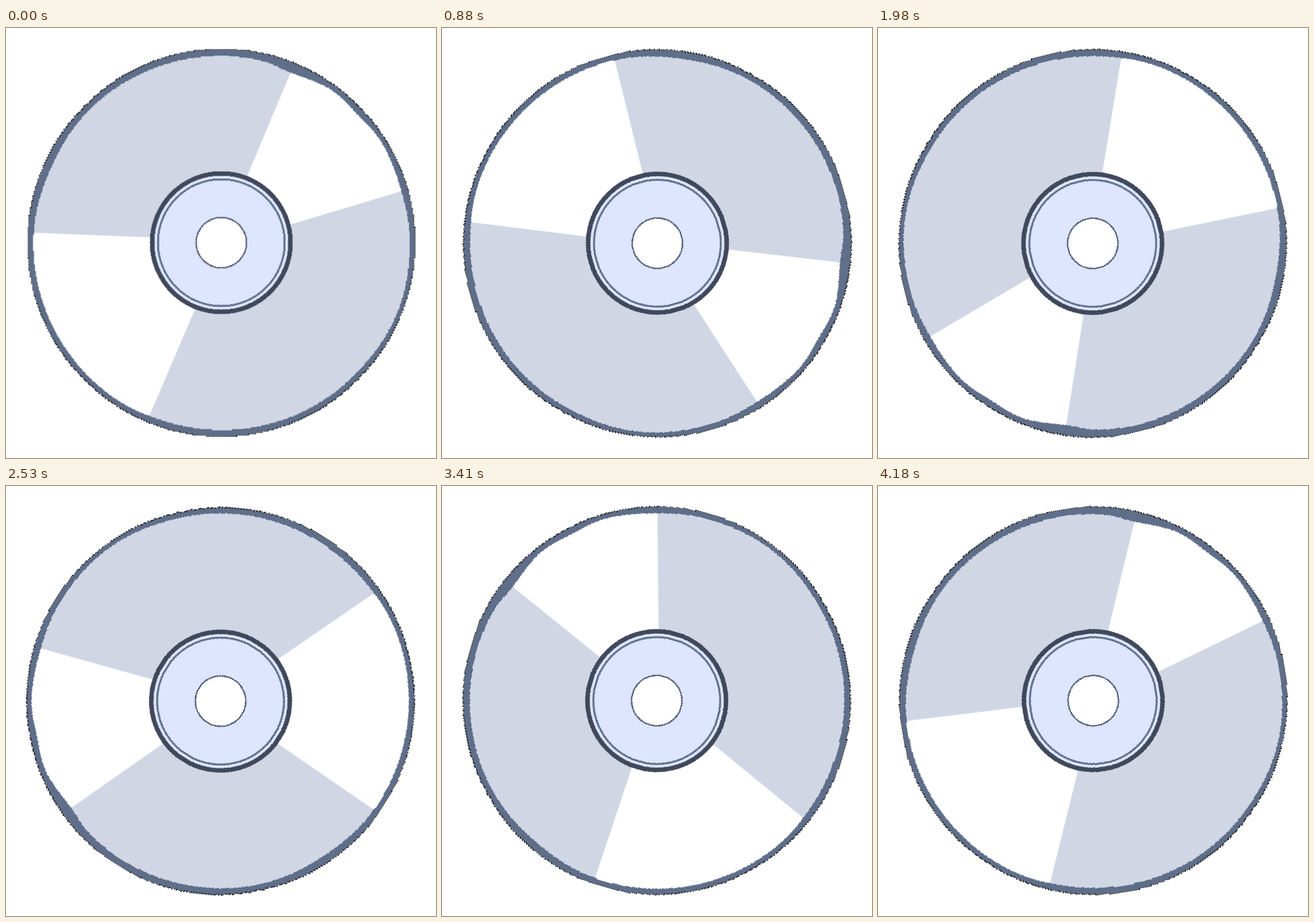
Animation, 661 px wide and 661 px high, one loop 4.29 s. Source, as an HTML page:

```html
<!DOCTYPE html>
<html lang="en">
<head>
<meta charset="utf-8">
<title>Spinning disc</title>
<style>
  html, body { margin: 0; width: 100%; height: 100%; overflow: hidden; background: #fff; }
  svg { display: block; width: 100vw; height: 100vh; }
  #disc { animation: spin 4290ms steps(39) infinite; }
  @keyframes spin { to { transform: rotate(360deg); } }
</style>
</head>
<body>
<svg viewBox="-330.5 -330.5 661 661" shape-rendering="crispEdges">
  <defs><clipPath id="face"><path id="faceClip"/></clipPath></defs>
  <g id="disc">
    <!-- The disc sits slightly off its axis, so it wobbles. -->
    <g transform="translate(.5 -.5)">
      <path id="rimEdge" fill="none" stroke="#000" stroke-width="2" stroke-dasharray="2 1"/>
      <path id="rim" fill="#5f6e89"/>
      <path id="inner" fill="#d0d6e4"/>
      <g id="wedges" fill="#fff" clip-path="url(#face)" shape-rendering="auto"></g>
      <circle r="110" fill="#40485c"/>
      <circle r="103" fill="#dde5ff"/>
      <circle r="97.5" fill="none" stroke="#5f6e89" stroke-width="3"/>
      <circle r="40" fill="#5f6e89"/>
      <circle r="38" fill="#fff" stroke="#000" stroke-width=".8" stroke-dasharray="2 2"/>
    </g>
  </g>
</svg>
<script>
  const $ = id => document.getElementById(id);

  // Angles run clockwise from the top, in degrees.
  const polar = (r, deg) => {
    const a = deg * Math.PI / 180;
    return [r * Math.sin(a), -r * Math.cos(a)];
  };

  // Closed staircase outline, snapped to a square grid.
  function stairs(radius, cell) {
    const snap = v => (Math.round(v / cell) * cell).toFixed(2);
    let d = '', lastX, lastY;
    for (let i = 0; i < 1440; i++) {
      const deg = i / 4;
      const [x, y] = polar(radius(deg), deg).map(snap);
      if (!d) d = `M${x} ${y}`;
      else {
        if (x !== lastX) d += `H${x}`;
        if (y !== lastY) d += `V${y}`;
      }
      lastX = x;
      lastY = y;
    }
    return d + 'Z';
  }

  // Inner edge of the slightly uneven rim: [angle, radius].
  const edge = [
    [0, 287.5], [12, 286.5], [22, 282], [37, 289], [46, 287], [57, 290],
    [74, 287.5], [90, 289.5], [110, 291], [136, 288.5], [196, 287.5],
    [215, 289.5], [245, 289], [272, 289], [295, 286.5], [316, 288.5], [360, 287.5]
  ];

  function edgeRadius(deg) {
    const i = edge.findIndex(p => p[0] > deg);
    const [a0, r0] = edge[i - 1], [a1, r1] = edge[i];
    const t = (1 - Math.cos(Math.PI * (deg - a0) / (a1 - a0))) / 2;
    return r0 + (r1 - r0) * t;
  }

  const rim = stairs(() => 297, 1.98);
  $('rimEdge').setAttribute('d', rim);
  $('rim').setAttribute('d', rim);

  const face = stairs(edgeRadius, 1.5);
  $('inner').setAttribute('d', face);
  $('faceClip').setAttribute('d', face);

  function wedge(near0, far0, far1, near1) {
    const points = [
      polar(105, near0), polar(305, far0), polar(400, (far0 + far1) / 2),
      polar(305, far1), polar(105, near1)
    ];
    const shape = document.createElementNS('http://www.w3.org/2000/svg', 'polygon');
    shape.setAttribute('points', points.join(' '));
    $('wedges').append(shape);
  }
  wedge(21.2, 22.2, 74, 75.4);
  wedge(201.5, 202.6, 273, 274.4);
</script>
</body>
</html>
```
